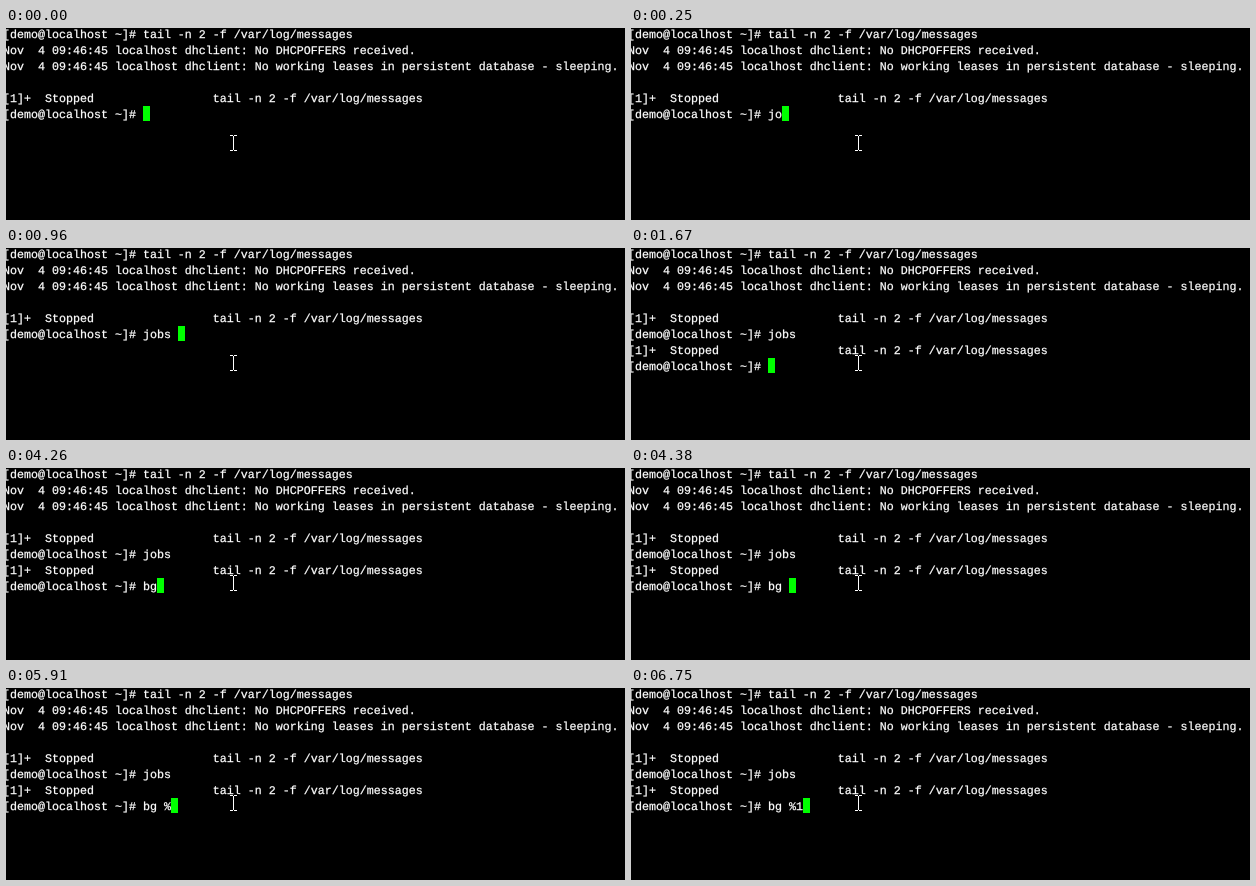
Animation of 619 by 192 pixels, one loop 8 s. Source, as an HTML page:

```html
<!DOCTYPE html>
<html lang="en">
<head>
<meta charset="utf-8">
<title>Terminal</title>
<style>
  html, body { margin: 0; width: 100%; height: 100%; overflow: hidden; background: #000; }
  svg { display: block; width: 100%; height: 100%; }
  text {
    font: 11.667px "Liberation Mono", monospace;
    fill: #fff;
    stroke: #fff;
    stroke-width: .25px;
    white-space: pre;
    text-rendering: geometricPrecision;
  }
</style>
</head>
<body>
<svg viewBox="0 0 619 192">
  <rect width="619" height="192" fill="#000"/>
  <g id="screen"></g>
  <rect id="cursor" width="7" height="15" fill="#0f0"/>
  <path d="M224 107.5h3m1 0h3M227.5 108v14M224 122.5h3m1 0h3" fill="none" stroke="#fff"/>
</svg>
<script>
const LOOP = 8000, CELL = 7, LINE = 16, LEFT = -3;
const PROMPT = "[demo@localhost ~]# ";
const TAIL = "tail -n 2 -f /var/log/messages";
const LOG = "Nov  4 09:46:45 localhost dhclient: ";
const JOB = "[1]+  Stopped".padEnd(30) + TAIL;
const HISTORY = [
  PROMPT + TAIL,
  LOG + "No DHCPOFFERS received.",
  LOG + "No working leases in persistent database - sleeping.",
  "",
  JOB
];
const ENTER = 1670;
// Time of each key press in the two commands
const first = { text: "jobs ", keys: [130, 250, 810, 960, 960] };
const second = { text: "bg %1", keys: [3860, 4260, 4380, 5910, 6750] };

const screen = document.getElementById("screen");
const cursor = document.getElementById("cursor");
const rows = Array.from({ length: 8 }, (_, i) => {
  const row = document.createElementNS("http://www.w3.org/2000/svg", "text");
  row.setAttribute("x", LEFT);
  row.setAttribute("y", i * LINE + 10);
  return screen.appendChild(row);
});

const typed = (cmd, t) => PROMPT + cmd.text.slice(0, cmd.keys.filter(k => k <= t).length);

function render(t) {
  const lines = [...HISTORY, typed(first, t)];
  if (t >= ENTER) lines.push(JOB, typed(second, t));
  rows.forEach((row, i) => {
    const s = lines[i] || "";
    if (row.textContent !== s) row.textContent = s;
  });
  const last = lines.length - 1;
  cursor.setAttribute("x", LEFT + lines[last].length * CELL);
  cursor.setAttribute("y", last * LINE - 2);
}

const start = performance.now();
function tick() {
  render((performance.now() - start) % LOOP);
  requestAnimationFrame(tick);
}
tick();
</script>
</body>
</html>
```
